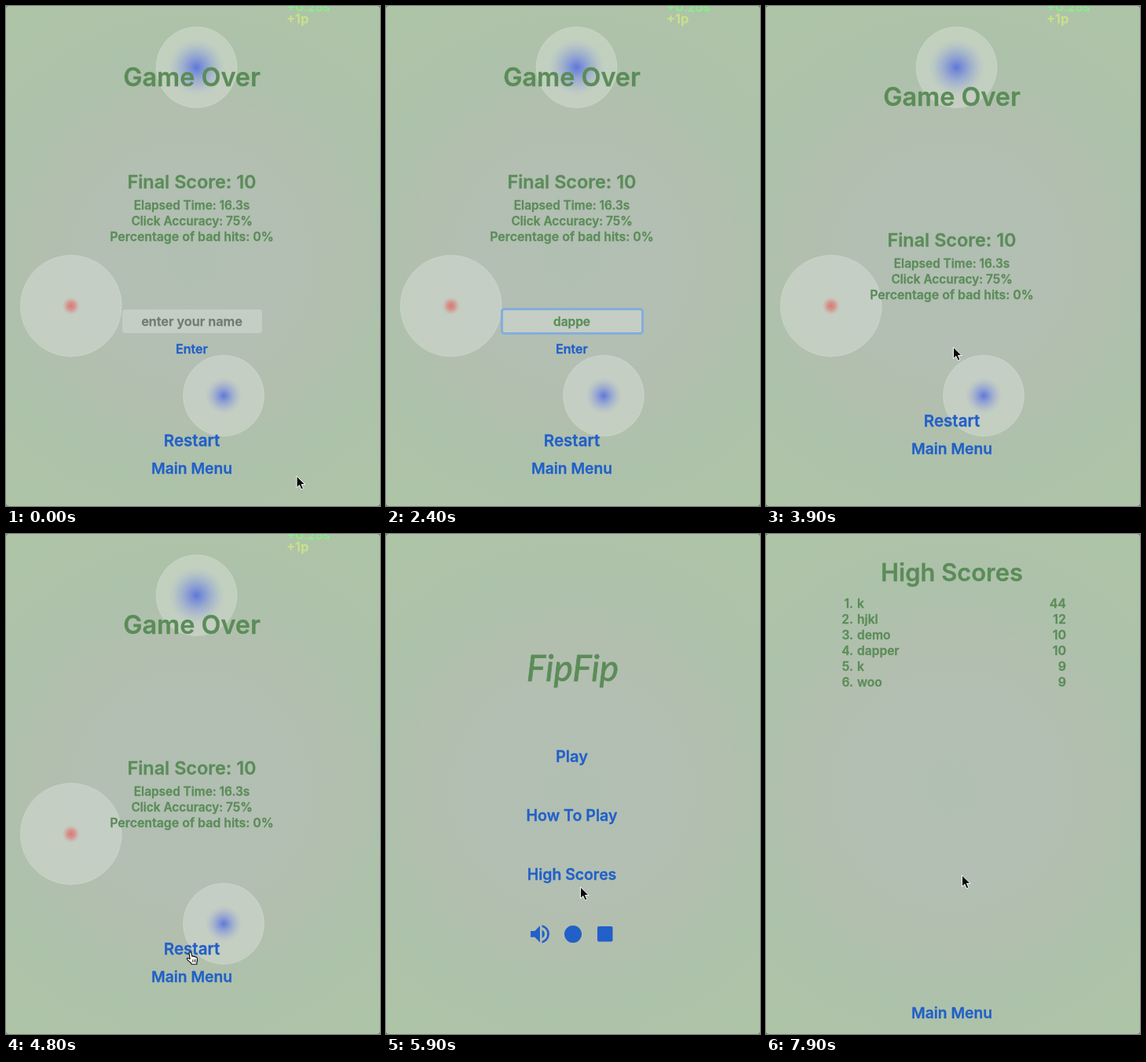
Animation of 476 by 636 pixels, one loop 8000 ms. Source, as an HTML page:

```html
<!DOCTYPE html>
<html lang="en">
<head>
<meta charset="utf-8">
<title>Game Over</title>
<style>
html, body { margin: 0; width: 100%; height: 100%; overflow: hidden; background: #68836a; }
svg { display: block; width: 476px; height: 636px; }
text {
  font: 600 16px Inter, Roboto, sans-serif; text-anchor: middle; white-space: pre;
  color: #5b8c58; fill: currentColor; stroke: currentColor; stroke-width: .3; stroke-linejoin: round;
}
.link { color: #2160c8; }
.logo { font: italic 400 46px Lato, sans-serif; stroke-width: .8; }
.start { text-anchor: start; }
.end { text-anchor: end; }
.focus { fill: none; stroke: #84addd; stroke-width: 3; }
.icon { fill: #2160c8; }
</style>
</head>
<body>
<svg viewBox="0 0 476 636">
  <defs>
    <radialGradient id="bg" gradientUnits="userSpaceOnUse" cx="236" cy="325" r="400">
      <stop offset="0" stop-color="#b1beb2"/>
      <stop offset=".3" stop-color="#b2bfb2"/>
      <stop offset=".5" stop-color="#b2bfae"/>
      <stop offset=".62" stop-color="#adc1ab"/>
      <stop offset="1" stop-color="#aec4a6"/>
    </radialGradient>
    <radialGradient id="blue">
      <stop offset="0" stop-color="#6078d9"/>
      <stop offset=".2" stop-color="#7389d8" stop-opacity=".9"/>
      <stop offset=".6" stop-color="#8fa0d6" stop-opacity=".5"/>
      <stop offset="1" stop-color="#a8b5d2" stop-opacity="0"/>
    </radialGradient>
    <radialGradient id="red">
      <stop offset="0" stop-color="#d67a74"/>
      <stop offset=".45" stop-color="#d68a84" stop-opacity=".8"/>
      <stop offset="1" stop-color="#d0aaa4" stop-opacity="0"/>
    </radialGradient>
  </defs>
  <rect width="476" height="636" rx="4" fill="url(#bg)"/>
  <g id="over">
    <g id="dots"></g>
    <g id="head"></g>
    <g id="stats"></g>
    <g id="form">
      <rect x="148" y="386" width="178" height="30" rx="4" fill="#fff" fill-opacity=".23"/>
      <rect id="field" class="focus" x="147.5" y="385.5" width="179" height="31" rx="3"/>
    </g>
    <g id="nav"></g>
    <rect id="menuFocus" class="focus" x="172.5" y="543" width="128" height="39.5" rx="3"/>
  </g>
  <g id="menu">
    <g class="icon">
      <path transform="translate(180.1 493) scale(1.32)" d="M3 9v6h4l5 5V4L7 9H3zM16.5 12A4.5 4.5 0 0 0 14 8v8a4.5 4.5 0 0 0 2.500-4zM14 3.200v2.100a7 7 0 0 1 0 13.400v2.100a9 9 0 0 0 0-17.600z"/>
      <circle cx="238" cy="509" r="11"/>
      <rect x="269" y="499" width="19.500" height="19.500" rx="2"/>
    </g>
    <rect id="scoreFocus" class="focus" x="167.500" y="413" width="138" height="39.500" rx="3"/>
  </g>
  <g id="scores"><g id="rows"></g></g>
  <circle id="ring" r="30.500" fill="none" stroke="#151915" stroke-width="1.500"/>
  <g id="pointer">
    <path id="arrow" transform="scale(.94)" d="M0 0V15.500L3.600 12.200L6.200 18L8.900 16.800L6.400 11.200H11.200Z" fill="#0a0a0a" stroke="#fff" stroke-width="1" stroke-linejoin="round"/>
    <g id="hand" transform="translate(-5 -1)">
      <path d="M3.600 2Q4 .6 5.300 1Q6.200 1.400 6.500 2.800L7.500 6.500Q9 5.700 9.800 6.800Q11.300 6.200 12 7.500Q13.600 7.200 13.900 9L14.200 11.500Q14.200 13 13.400 14.200V16.500H6.700L6 14.800L1.500 10.800Q.2 9.300 1.500 8.700Q2.600 8.400 4.700 10Z" fill="#fff" stroke="#0a0a0a" stroke-width="1.100" stroke-linejoin="round"/>
      <path d="M7.900 10.500L8.400 14M10 10.300L10.300 14M12 10.200V14" stroke="#0a0a0a" stroke-width=".8"/>
    </g>
  </g>
</svg>
<script>
const NS = 'http://www.w3.org/2000/svg';
const LOOP = 8000, STEP = 100;
const $ = id => document.getElementById(id);

function add(parent, tag, attrs) {
  const el = document.createElementNS(NS, tag);
  for (const key in attrs) el.setAttribute(key, attrs[key]);
  return $(parent).appendChild(el);
}

function label(parent, str, y, size, cls = '', x = 236.5) {
  const el = add(parent, 'text', { x, y, class: cls });
  if (size) el.style.fontSize = size + 'px';
  el.textContent = str;
  return el;
}

function dot(x, y, r, glow, hue) {
  add('dots', 'circle', { cx: x, cy: y, r: r - .5, fill: '#fff', 'fill-opacity': .24, stroke: '#fff', 'stroke-opacity': .16 });
  add('dots', 'circle', { cx: x, cy: y, r: glow, fill: `url(#${hue})` });
}

dot(242.5, 78, 52, 36, 'blue');
dot(82.8, 381.5, 65, 11.5, 'red');
dot(277, 495.7, 52, 23.5, 'blue');
label('dots', '+0.25s', 7, 16.4, 'start', 357).style.color = '#90e892';
label('dots', '+1p', 22, 16.4, 'start', 357).style.color = '#cbe08c';

label('head', 'Game Over', 102, 32.4);
label('stats', 'Final Score: 10', 232, 23.4);
label('stats', 'Elapsed Time: 16.3s', 259, 15.4);
label('stats', 'Click Accuracy: 75%', 279, 15.4);
label('stats', 'Percentage of bad hits: 0%', 299, 15.9);
const hint = label('form', 'enter your name', 407, 16.3);
hint.style.color = '#717c70';
const typed = label('form', '', 407, 15.5);
const enter = label('form', 'Enter', 442, 16, 'link');
label('nav', 'Restart', 560, 20.5, 'link');
label('nav', 'Main Menu', 595, 19.2, 'link');

label('menu', 'FipFip', 187, 0, 'logo', 237.5);
label('menu', 'Play', 290, 20, 'link');
label('menu', 'How To Play', 365, 19.6, 'link');
label('menu', 'High Scores', 440, 19.4, 'link');

const player = 'dapper';
label('scores', 'High Scores', 60, 30.9);
label('scores', 'Main Menu', 616, 19.2, 'link');
[['k', 44], ['hjkl', 12], ['demo', 10], [player, 10], ['k', 9], ['woo', 9]].forEach(([name, score], i) => {
  const y = 94 + 20 * i;
  label('rows', i + 1 + '.', y, 15.6, 'end', 111);
  label('rows', name, y, 15.6, 'start', 116);
  label('rows', score, y, 16, 'end', 382);
});

// Pointer hot spot: [time, x, y]
const path = [
  [0, 370, 598], [100, 370, 598], [450, 290, 404], [600, 290, 404], [900, 458, 452],
  [2800, 458, 452], [2850, 385, 462], [3400, 259, 437], [3700, 259, 437], [3900, 238.5, 434],
  [4400, 238.5, 434], [5000, 233, 566], [5400, 233, 566], [5800, 247.5, 449], [5900, 247.5, 449],
  [6100, 249.5, 434], [8000, 249.5, 434]
];
const clicks = [[400, 600], [3600, 3700], [5200, 5400], [6100, 6300]];
const hovers = [[3300, 3700], [4800, 5400], [6000, 6300]];

const within = (t, spans) => spans.some(([a, b]) => t >= a && t < b);
const show = (id, on) => { $(id).style.display = on ? '' : 'none'; };
const shift = (id, y) => $(id).setAttribute('transform', `translate(0 ${y})`);

function place(t) {
  const i = path.findIndex(p => p[0] > t);
  const [t0, x0, y0] = path[i - 1], [t1, x1, y1] = path[i];
  const u = (t - t0) / (t1 - t0), k = u * u * (3 - 2 * u);
  return `translate(${x0 + (x1 - x0) * k} ${y0 + (y1 - y0) * k})`;
}

function draw(t) {
  const sent = t >= 3700;
  show('over', t < 5400);
  show('menu', t >= 5400 && t < 6300);
  show('scores', t >= 6300);
  show('rows', t >= 6400);

  shift('head', sent ? 25 : 0);
  shift('stats', sent ? 74 : 0);
  shift('nav', sent ? -25 : 0);
  show('form', !sent);
  show('field', t >= 500);
  show('menuFocus', t >= 5200);
  show('scoreFocus', t >= 6200);

  const count = Math.max(0, Math.min(player.length, Math.floor((t - 1400) / 180)));
  typed.textContent = player.slice(0, count);
  hint.style.display = count ? 'none' : '';
  const over = within(t, hovers);
  enter.style.fontSize = (over ? 19.2 : 16) + 'px';

  const spot = place(t);
  $('pointer').setAttribute('transform', spot);
  $('ring').setAttribute('transform', spot);
  show('pointer', t < 1500 || t >= 2900);
  show('arrow', !over);
  show('hand', over);
  show('ring', within(t, clicks));
}

const begin = performance.now();
function tick() {
  const t = (performance.now() - begin) % LOOP;
  draw(Math.floor(t / STEP) * STEP);
  requestAnimationFrame(tick);
}
tick();
</script>
</body>
</html>
```
